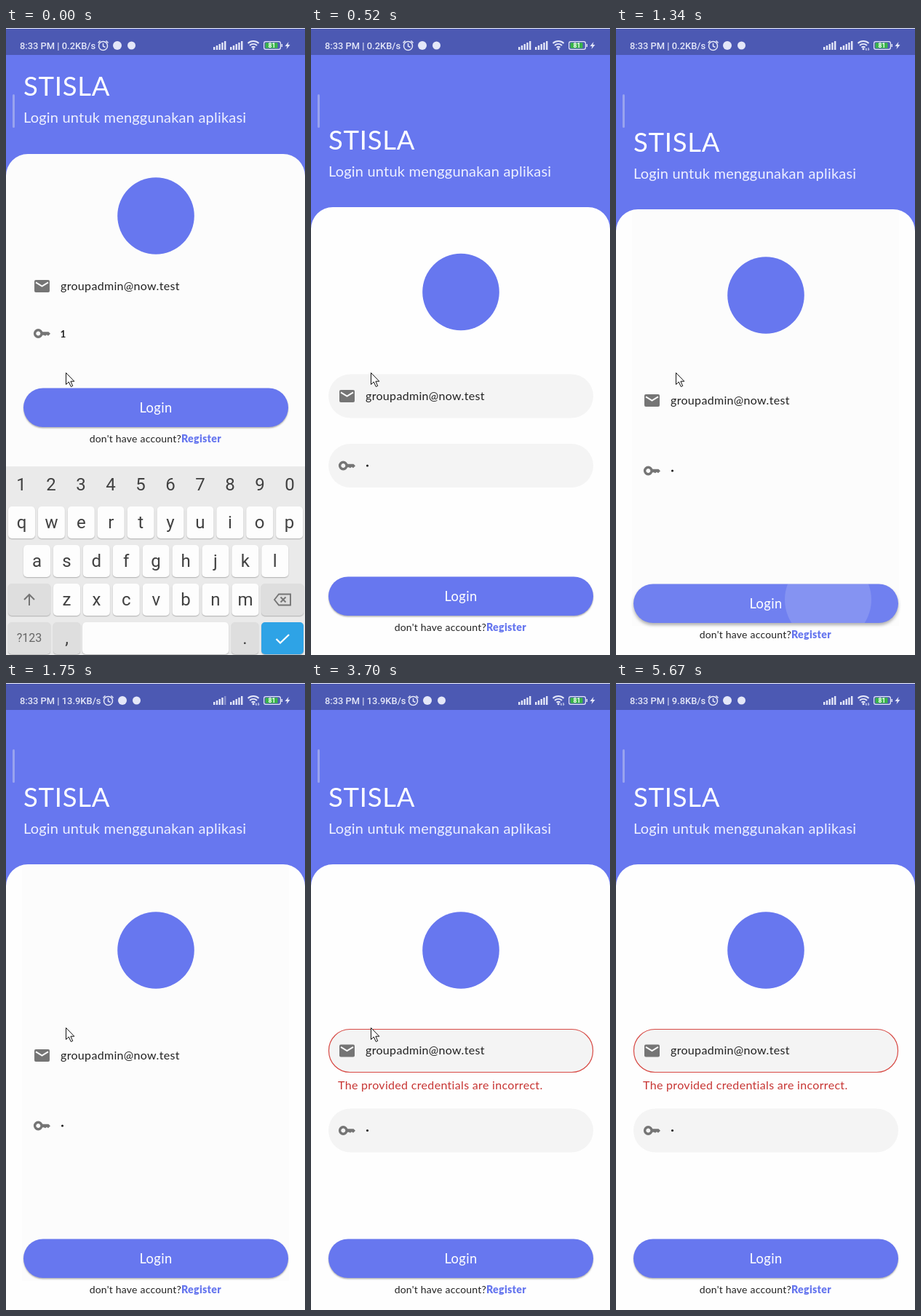
Animation of 411x861 px, one loop 5.94 s. Source, as an HTML page with a canvas:

```html
<!DOCTYPE html>
<html lang="id">
<head>
<meta charset="utf-8">
<title>Login</title>
<style>
  html, body { margin: 0; height: 100%; overflow: hidden; background: #fefefe; }
  canvas { display: block; }
</style>
</head>
<body>
<canvas id="stage" width="411" height="861"></canvas>
<script>
const ctx = document.getElementById('stage').getContext('2d');
const LOOP = 5940;
const BLUE = '#6777ef', GREY = '#757575', INK = '#222', RED = '#d84a45', PALE = '#e4e7f8';

// Vertical positions of the form, keyed by the time they take effect
const layouts = [
  [0,    { title: 93,  card: 173, logo: 258,   email: 354.5, pass: 419.5, button: 494, foot: 569 }],
  [520,  { title: 167, card: 246, logo: 362.5, email: 505.5, pass: 601,   button: 753, foot: 828 }],
  [640,  { title: 170, card: 249, logo: 367,   email: 511.5, pass: 608,   button: 763, foot: 838 }],
  [1900, { title: 170, card: 249, logo: 367,   email: 505,   pass: 614.5, button: 763, foot: 838 }],
];
const speeds = [[0, '0.2KB/s'], [1460, '13.9KB/s'], [5670, '9.8KB/s']];
const ripples = [[0, null], [1340, { r: 59.5, alpha: .15 }], [1460, { r: 150, alpha: .12 }],
                 [1580, { r: 300, alpha: .06 }], [1750, null]];
const errors = [[0, 0], [1900, .3], [2020, .8], [2140, 1]];
const cursors = [[0, [82.5, 473.5]], [4940, [216.5, 758.5]], [5070, null]];

const at = (steps, t) => steps.findLast(step => step[0] <= t)[1];

function text(str, x, y, size, color, { weight = 400, font = 'Lato', align = 'left', spacing = .02 } = {}) {
  ctx.font = `${weight} ${size}px ${font}, sans-serif`;
  ctx.letterSpacing = font === 'Lato' ? `${size * spacing}px` : '0px';
  ctx.textAlign = align;
  ctx.fillStyle = color;
  ctx.fillText(str, x, y);
}

function rect(x, y, w, h, color, r = 0) {
  ctx.beginPath();
  ctx.roundRect(x, y, w, h, r);
  ctx.fillStyle = color;
  ctx.fill();
}

function disc(x, y, r, color) {
  ctx.beginPath();
  ctx.arc(x, y, r, 0, 7);
  ctx.fillStyle = color;
  ctx.fill();
}

function line(path, color, width, x = 0, y = 0, fill) {
  ctx.save();
  ctx.translate(x, y);
  const shape = new Path2D(path);
  if (fill) { ctx.fillStyle = fill; ctx.fill(shape); }
  if (width) { ctx.strokeStyle = color; ctx.lineWidth = width; ctx.stroke(shape); }
  ctx.restore();
}

function shadowed(color, blur, dy, draw) {
  ctx.save();
  Object.assign(ctx, { shadowColor: color, shadowBlur: blur, shadowOffsetY: dy });
  draw();
  ctx.restore();
}

function statusBar(t) {
  rect(0, 0, 411, 37, '#4c59b3');
  rect(0, 0, 411, 1, '#eef0fa');
  const speed = at(speeds, t);
  text('8:33 PM | ' + speed, 19, 29, 12.9, PALE, { weight: 500, font: 'Roboto' });

  const dx = speed.length > 7 ? 7 : 0;
  line('M6 0A6 6 0 1 1 -6 0A6 6 0 1 1 6 0M0 -3.5V.5L3 2M-7 -4L-4 -7M7 -4L4 -7', PALE, 1.5, 133.5 + dx, 24.5);
  disc(153 + dx, 24, 6, PALE);
  disc(172.5 + dx, 24, 5.5, PALE);

  for (const left of [285, 308]) {
    for (let i = 0; i < 5; i++) {
      const weak = left === 285 && i === 4 && t >= 1460 && t < 3700;
      const h = 4 + i * 2;
      rect(left + i * 3.75, 30 - h, 2.4, h, weak ? '#8890cc' : PALE);
    }
  }

  line('M-7.5 -7A11 11 0 0 1 7.5 -7M-5 -4A7 7 0 0 1 5 -4M-2.5 -1.2A4 4 0 0 1 2.5 -1.2', PALE, 1.9, 340, 28);
  disc(340, 28.7, 1.5, PALE);
  if (t >= 1190) line('M4 3V0L3 1.2M7 -1V2.5L8 1.2', PALE, 1, 340, 28);

  rect(354, 18, 24, 12, PALE, 3);
  rect(355.2, 19.2, 21.6, 9.6, '#4c59b3', 2);
  rect(356.5, 20.2, 17, 7.6, '#39b54a', 1);
  rect(378.5, 22, 1.5, 4, PALE);
  text('81', 365.5, 27.3, 8.5, '#fff', { weight: 700, font: 'Roboto', align: 'center' });
  line('M1.5 -5L-3.5 1H-.5L-1.5 5L3.5 -1H.5z', '', 0, 387, 24, PALE);
}

function header(y) {
  rect(0, 37, 411, 260, BLUE);
  rect(9, 91, 3, 46, '#99a3ee', 1.5);
  text('STISLA', 24, y.title, 36.5, '#fff');
  text('Login untuk menggunakan aplikasi', 24, y.title + 37, 20, '#eef0ff', { spacing: .01 });
}

function field(y, visible, error) {
  if (visible) rect(24, y - 30, 364, 60, '#f4f4f4', 30);
  if (!error) return;
  ctx.globalAlpha = error;
  ctx.beginPath();
  ctx.roundRect(24.5, y - 29.5, 363, 59, 29);
  ctx.strokeStyle = RED;
  ctx.lineWidth = 1.2;
  ctx.stroke();
  text('The provided credentials are incorrect.', 37, y + 53 - 5 * (1 - error), 16, '#c73533');
  ctx.globalAlpha = 1;
}

function mailIcon(y) {
  rect(39, y - 8.5, 21, 17, GREY, 2);
  line('M41 -5.2L49.5 0L58 -5.2', '#fafafa', 2, 0, y);
}

function keyIcon(y) {
  line('M49 0A4.7 4.7 0 1 1 39.6 0A4.7 4.7 0 1 1 49 0', GREY, 3.4, 0, y);
  line('M49.5 -2.2H58.5L61 .2L58 3.3L56 1.8L54 3.3L52 2.2H49.5z', '', 0, 0, y, GREY);
}

function loginButton(top, ripple) {
  const pressed = ripple && ripple.r < 100;
  shadowed('rgba(0,0,0,.3)', pressed ? 4 : 2, pressed ? 3 : 1.5,
    () => rect(24, top + .5, 364, 53.5, ripple ? '#7080f0' : BLUE, 27));
  if (ripple) {
    ctx.save();
    ctx.clip();
    disc(291.5, top + 22, ripple.r, `rgba(255,255,255,${ripple.alpha})`);
    ctx.restore();
  }
  text('Login', 206, top + 33.5, 18.3, '#fff', { align: 'center' });
}

function form(t, y) {
  const flat = t >= 1340 && t < 1900;
  rect(0, y.card, 411, 900, t < 520 ? '#fcfcfc' : '#fefefe', 30);
  if (flat) rect(22, y.card + 1, 367, 571, '#fcfcfc');
  disc(206, y.logo, 52.8, BLUE);

  const boxed = t >= 520 && !flat;
  field(y.email, boxed, at(errors, t));
  mailIcon(y.email);
  text('groupadmin@now.test', 75, y.email + 5, 16, INK);

  ctx.save();
  if (t >= 400 && t < 520) {
    // Only the part below this edge has been repainted
    ctx.beginPath();
    ctx.rect(0, 415, 411, 446);
    ctx.clip();
  }
  field(y.pass, boxed || (t >= 400 && t < 520));
  keyIcon(y.pass);
  ctx.restore();
  if (t < 400) text('1', 74.5, y.pass + 5, 13.5, INK, { weight: 700 });
  else disc(77.5, y.pass, 1.6, INK);

  loginButton(y.button, at(ripples, t));
  text("don't have account?", 241, y.foot, 14, INK, { align: 'right', spacing: .015 });
  text('Register', 241, y.foot, 14.2, BLUE, { weight: 900 });
}

function key(x, y, w, label, color = '#fdfdfd', ink = '#414141', size = 24) {
  shadowed('rgba(0,0,0,.25)', 1.5, 1, () => rect(x, y, w, 44, color, 5));
  if (label) text(label, x + w / 2, y + 22 + size * .34, size, ink, { font: 'Roboto', align: 'center' });
}

function keyboard(top) {
  const row = (letters, x, y) => [...letters].forEach((c, i) => key(x + i * 40.9, y, 37, c));
  const dim = '#dedede';
  ctx.save();
  ctx.translate(0, top);
  rect(0, 0, 411, 260, '#eaeaea');
  [...'1234567890'].forEach((c, i) =>
    text(c, 21 + i * 41, 32.5, 24, '#414141', { font: 'Roboto', align: 'center' }));
  row('qwertyuiop', 3, 55);
  row('asdfghjkl', 24, 108);
  row('zxcvbnm', 65, 161);
  key(3, 161, 58, '', dim);
  line('M0 8V-7M-7 0L0 -7L7 0', GREY, 2, 32, 183);
  key(351, 161, 58, '', dim);
  line('M-11 0L-5 -7.5H11V7.5H-5zM-2.5 -3.5L4.5 3.5M4.5 -3.5L-2.5 3.5', GREY, 1.9, 380, 183);
  key(3, 214, 58, '?123', dim, '#666', 16);
  key(65, 214, 37, ',', dim);
  key(105, 214, 201);
  key(310, 214, 37, '.', dim);
  key(351, 214, 58, '', '#2ea3e6');
  line('M-8.5 0L-3 5.5L9 -6', '#fff', 2.3, 380, 237);
  ctx.restore();
}

function render(now) {
  const t = now % LOOP;
  const y = at(layouts, t);
  const cursor = at(cursors, t);
  header(y);
  form(t, y);
  if (t < 520) keyboard(t < 400 ? 602 : 840);
  statusBar(t);
  if (cursor) line('M0 0V16L3.8 12.5L6.8 19L9.2 18L6.4 11.7H11.3z', '#111', 1, ...cursor, '#fff');
  requestAnimationFrame(() => render(performance.now() - start));
}

const start = performance.now();
render(0);
</script>
</body>
</html>
```
